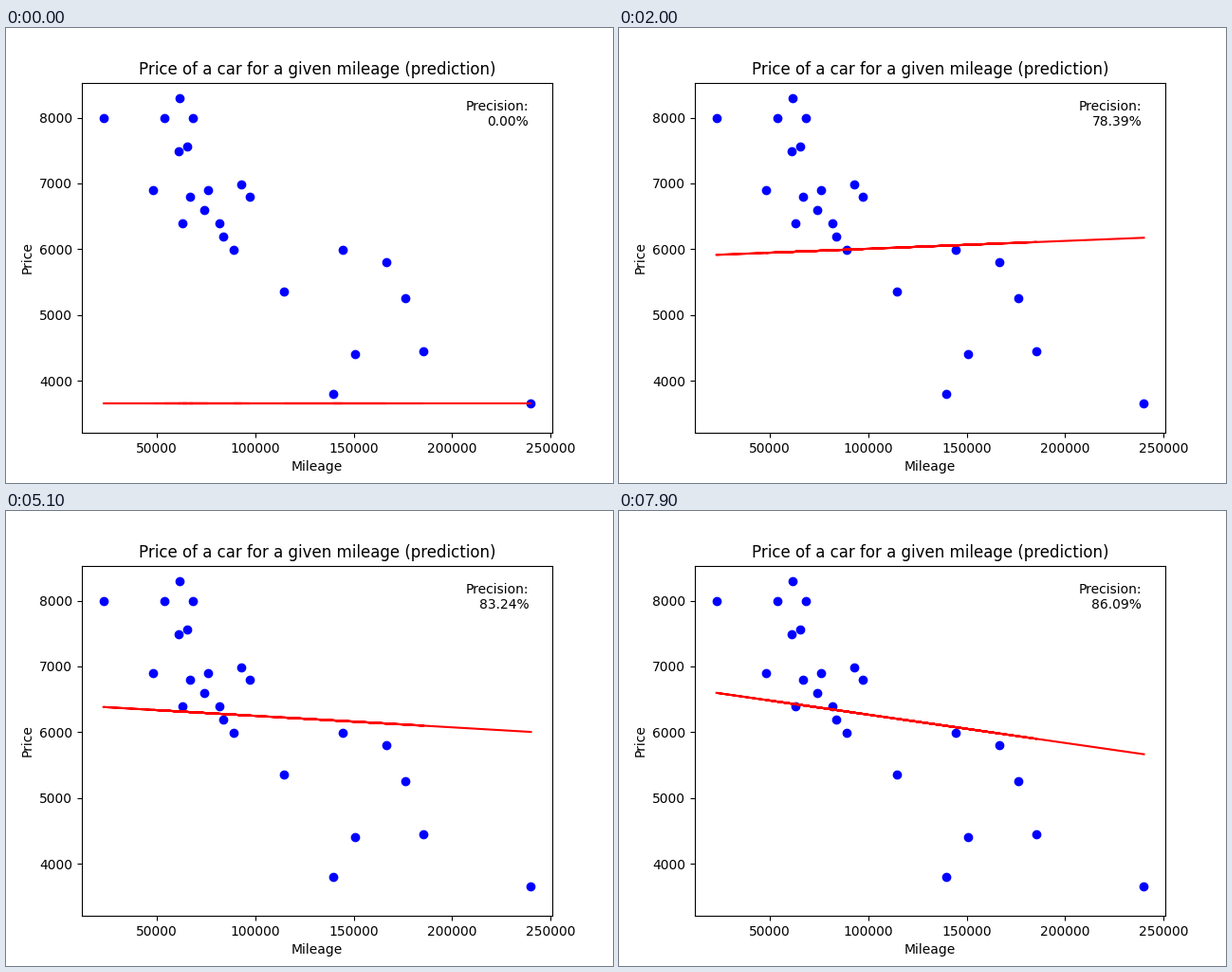
Recreate the animation shown at these times as a matplotlib script. Size 640 px wide and 480 px high, loop 8 s.

```python
import matplotlib.pyplot as plt
import numpy as np
from matplotlib.animation import FuncAnimation

FRAMES = 80
RATE = 0.1

# Cars from cheapest to dearest; the mid-range prices climb in steps.
km = 1000 * np.array([
    240, 139.8, 150.5, 185.5, 176, 114.8, 166.8, 89, 144.5, 84, 82, 63,
    74, 97.5, 67, 76, 48.2, 93, 61, 65.7, 54, 68.5, 22.9, 61.8])
stairs = 5995 + 200 * (2 * np.arange(8) // 3)
price = np.r_[3650, 3800, 4400, 4450, 5250, 5350, 5800, stairs,
              6900, 6900, 6990, 7490, 7555, np.full(3, 7990), 8290]


def normalize(values):
    return (values - values.min()) / np.ptp(values)


def descend(x, y, steps):
    """Return the (intercept, slope) held before each descent step."""
    theta = np.zeros(2)
    path = []
    for _ in range(steps):
        path.append(theta)
        error = theta[0] + theta[1] * x - y
        theta = theta - RATE * np.array([error.mean(), (error * x).mean()])
    return path


x, y = normalize(km), normalize(price)
thetas = descend(x, y, FRAMES)
base_cost = np.mean(y ** 2)

fig, ax = plt.subplots(figsize=(6.4, 4.8), dpi=100)
ax.set_title("Price of a car for a given mileage (prediction)")
ax.set_xlabel("Mileage")
ax.set_ylabel("Price")
ax.plot(km, price, "bo")
line, = ax.plot(km, np.full(len(km), price.min()), "r-")
ax.set_ylim(3205, 8532)
label = ax.text(0.95, 0.95, "", transform=ax.transAxes, ha="right", va="top")


def update(i):
    intercept, slope = thetas[i]
    guess = intercept + slope * x
    precision = 1 - np.mean((guess - y) ** 2) / base_cost
    line.set_ydata(price.min() + guess * np.ptp(price))
    label.set_text(f"Precision:\n{precision:.2%}")
    return line, label


anim = FuncAnimation(fig, update, frames=FRAMES, interval=100, repeat=True)
plt.show()
```
